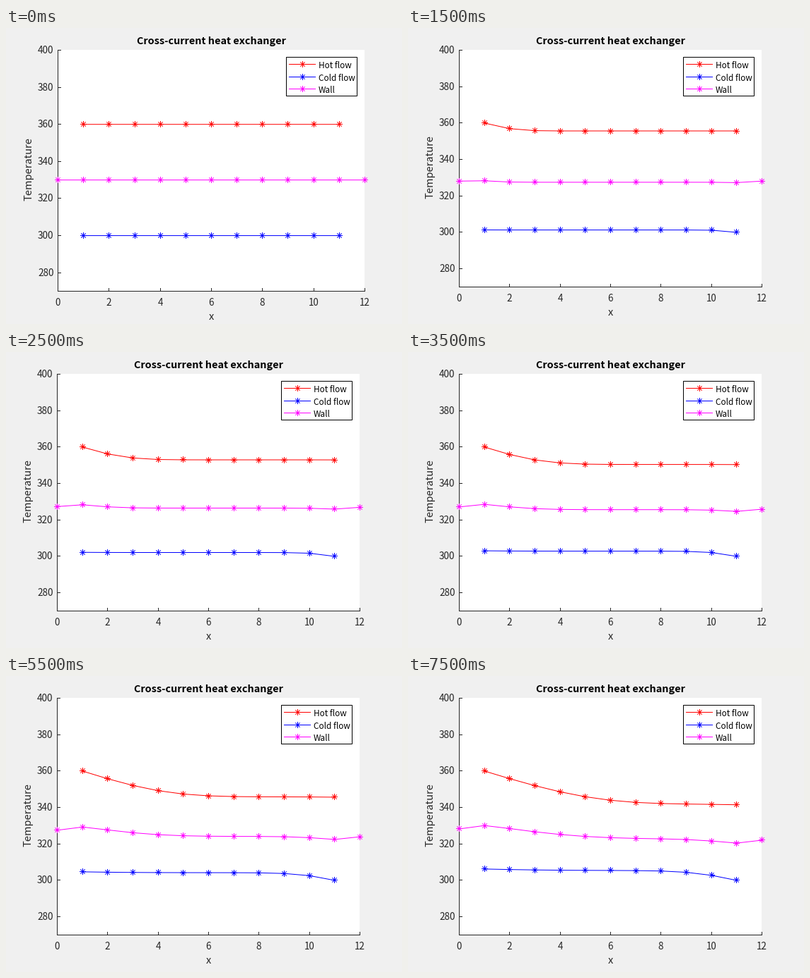
Recreate the animation shown at these times as a matplotlib script. Size 560x420 px, loop 8000 ms.

```python
import numpy as np
import matplotlib.pyplot as plt
from matplotlib.animation import FuncAnimation
from matplotlib.patches import Rectangle

DPI = 80
PT = 72 / DPI  # points per pixel
FRAMES, STEP_MS = 16, 500
FONT = "Noto Sans CJK JP"
GREY = "#262626"
RED, BLUE, PINK = "#ff0000", "#0000ff", "#ff00ff"
TOP, T_MIN, T_MAX, X_MAX = 31, 270, 400, 12

# asterisk strokes around a centre, separated by gaps
ARM, DIAG, GAP = 4, 2.8, np.nan
STAR_X = np.array([-ARM, ARM, GAP, 0, 0, GAP, -DIAG, DIAG, GAP, -DIAG, DIAG, GAP])
STAR_Y = np.array([0, 0, GAP, -ARM, ARM, GAP, -DIAG, DIAG, GAP, DIAG, -DIAG, GAP])


def simulate(n):
    """Explicit upwind steps of two opposed flows and the wall between them."""
    hot, cold, wall = np.full(11, 360.0), np.full(11, 300.0), np.full(13, 330.0)
    states = [(hot, cold, wall)]
    for _ in range(n - 1):
        h, c, w = hot.copy(), cold.copy(), wall.copy()
        mid = wall[1:-1]
        h[1:] += 0.325 * (hot[:-1] - hot[1:]) - 0.0487 * (hot - mid)[1:]
        c[:-1] += 0.1 * (cold[1:] - cold[:-1]) + 0.0075 * (hot - cold)[:-1]
        w[1:-1] += (0.45 * (0.46 * hot + 0.54 * cold - mid)
                    + 0.055 * (wall[:-2] - 2 * mid + wall[2:]))
        w[0], w[-1] = wall[2], wall[-3]  # mirrored ends
        hot, cold, wall = h, c, w
        states.append((hot, cold, wall))
    return states


states = simulate(FRAMES)
fig = plt.figure(figsize=(560 / DPI, 420 / DPI), dpi=DPI, facecolor="#f0f0f0")
ax = fig.add_axes([0, 0, 1, 1])


def line(x, y, color):
    ax.plot(x, y, color=color, lw=PT, snap=False)


def stars(x, y, color):
    cx, cy = np.round(x)[:, None], np.round(y)[:, None]
    line((cx + STAR_X).ravel(), (cy + STAR_Y).ravel(), color)


def curve(x, y, color):
    line(x, y, color)
    stars(x, y, color)


def label(x, y, text, px, color=GREY, ha="center", **kw):
    ax.text(x - 0.5, y, text, fontsize=px * PT, color=color, ha=ha,
            va="baseline", family=FONT, **kw)


def box(x, y, w, h, edge):
    ax.add_patch(Rectangle((x, y), w, h, fc="white", ec=edge, lw=PT, snap=False))


def draw_axes(left, right, bottom, px, py):
    box(left - 0.5, TOP - 0.5, right - left, bottom - TOP, "none")
    line([left, left], [TOP, bottom], GREY)
    line([left, right], [bottom, bottom], GREY)
    for v in range(0, X_MAX + 1, 2):
        x = round(px(v))
        line([x, x], [bottom, bottom - 4], GREY)
        label(x, bottom + 20.5, str(v), 13.5)
    for v in range(280, T_MAX + 1, 20):
        y = round(py(v))
        line([left, left + 4], [y, y], GREY)
        label(left - 5.5, y + 5, str(v), 13.6, ha="right")
    mid = (left + right) / 2
    label(mid, 22.5, "Cross-current heat exchanger", 14.4, "black", weight="bold")
    label(mid, bottom + 41, "x", 14.6)
    label(left - 36.5, (TOP + bottom) / 2 - 2, "Temperature", 14.6,
          rotation=90, rotation_mode="anchor")


def draw_legend(right):
    x = right - 111
    box(x, 41, 100, 55, "black")
    rows = ("Hot flow", RED, 51), ("Cold flow", BLUE, 69), ("Wall", PINK, 86)
    for name, color, y in rows:
        line([x + 4, x + 41], [y, y], color)
        stars(np.array([x + 23]), np.array([y]), color)
        label(x + 46, y + 5.5, name, 11.8, "black", ha="left")


def draw(k):
    ax.clear()
    # whole numbers fall on pixel centres
    ax.set(xlim=(-0.5, 559.5), ylim=(419.5, -0.5))
    ax.axis("off")
    # the plot area is slightly larger before the first step
    left, right, bottom = (72, 500, 367) if k else (73, 507, 373)

    def px(v):
        return left + (right - left) * v / X_MAX

    def py(t):
        return bottom - (bottom - TOP) * (t - T_MIN) / (T_MAX - T_MIN)

    draw_axes(left, right, bottom, px, py)
    hot, cold, wall = states[k]
    inner = px(np.arange(1, 12))
    curve(inner, py(hot), RED)
    curve(inner, py(cold), BLUE)
    curve(px(np.arange(13)), py(wall), PINK)
    draw_legend(right)
    return []


anim = FuncAnimation(fig, draw, frames=FRAMES, init_func=lambda: draw(0),
                     interval=STEP_MS, repeat=True, repeat_delay=0, blit=False)
plt.show()
```
